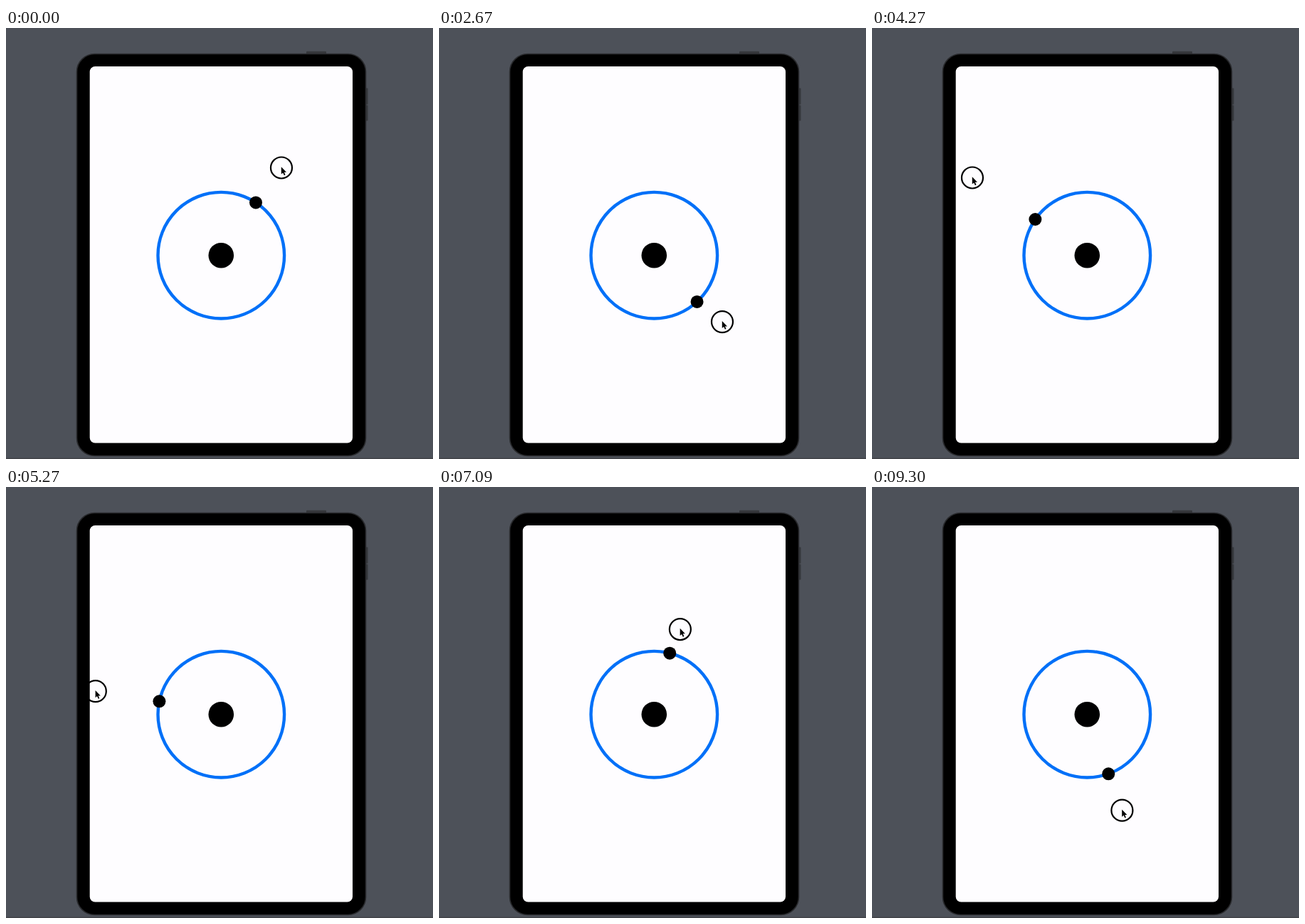
Recreate the animation shown at these times as an HTML page. Size 600 px wide and 606 px high, loop 9.39 s.

```html
<!DOCTYPE html>
<html lang="en">
<head>
<meta charset="utf-8">
<title>Orbit drag</title>
<style>
  html, body { margin: 0; width: 100%; height: 100%; overflow: hidden; background: #4d5159; }
  svg { display: block; width: 100vw; height: 100vh; }
</style>
</head>
<body>
<svg viewBox="0 0 600 606">
  <rect width="600" height="606" fill="#4d5159"/>
  <rect y="604.5" width="600" height="1.5" fill="#424449"/>
  <g fill="#36383c">
    <rect x="422" y="32.8" width="28" height="4" rx="1"/>
    <rect x="505" y="84.5" width="3.5" height="23" rx="1"/>
    <rect x="505" y="108.5" width="3.5" height="22" rx="1"/>
  </g>
  <rect x="99.5" y="36.5" width="406" height="565" rx="25" fill="#000" stroke="#292a2d" stroke-width="1.6"/>
  <rect x="117.7" y="54" width="369.3" height="529.5" rx="7.5" fill="#fefdff"/>
  <circle cx="302.3" cy="319.7" r="88.8" fill="none" stroke="#0070f8" stroke-width="4.4"/>
  <circle cx="302.3" cy="319.7" r="17.8"/>
  <circle id="knob" r="9"/>
  <g id="touch">
    <circle r="15" fill="none" stroke="#000" stroke-width="2.2"/>
    <path d="M-.2-1.2V9L2.2 6.9 3.9 10.7 5.5 10 3.9 6.3H7Z" stroke="#fff" stroke-width=".8" paint-order="stroke"/>
  </g>
</svg>
<script>
  const LOOP = 9390, LAST = 9300, LAG = 22;
  const CX = 302.3, CY = 319.7, R = 88.8;

  // Key poses of the drag around the centre: time, angle in degrees, distance
  const keys = [
    [-300, -68, 148], [0, -55.5, 149.5], [940, 35.6, 158.5], [1360, 106.7, 127.7],
    [1890, 152.5, 120], [2670, 44.3, 133.7], [3100, -10, 129], [3640, -96, 105],
    [4270, -145.9, 194.8], [4420, -148.7, 207], [4560, -148.7, 207],
    [5480, -188, 163], [5850, -236.6, 126], [6240, -196, 137.6], [6950, -91, 122.7],
    [7650, -3, 146], [7940, 44.2, 129.4], [8330, 122.8, 127.9],
    [8550, 134.7, 138], [8740, 134.7, 138], [LAST, 70, 143.6]
  ];

  // Tangent at a key: zero at turns, rests and both ends
  function slope(i, k) {
    const a = keys[i - 1], b = keys[i], c = keys[i + 1];
    if (!a || !c) return 0;
    const h = b[0] - a[0], g = c[0] - b[0];
    const before = (b[k] - a[k]) / h, after = (c[k] - b[k]) / g;
    return before * after <= 0 ? 0 : (before * g + after * h) / (h + g);
  }

  function pose(t) {
    let i = 0;
    while (i < keys.length - 2 && keys[i + 1][0] <= t) i++;
    const a = keys[i], b = keys[i + 1], h = b[0] - a[0], u = (t - a[0]) / h;
    const ease = u * u * (3 - 2 * u);
    const [deg, dist] = [1, 2].map(k =>
      a[k] + (b[k] - a[k]) * ease +
      h * u * (1 - u) * ((1 - u) * slope(i, k) - u * slope(i + 1, k)));
    return { angle: deg * Math.PI / 180, dist };
  }

  // 30 ms steps that lose 10 ms every second
  function tick(t) {
    const shift = 10 * Math.round(t / 1000);
    return Math.min(LAST, Math.floor((t - shift) / 30 + 1e-6) * 30 + shift);
  }

  const knob = document.getElementById('knob');
  const touch = document.getElementById('touch');

  function place(el, angle, dist) {
    const x = CX + dist * Math.cos(angle), y = CY + dist * Math.sin(angle);
    el.setAttribute('transform', `translate(${x.toFixed(2)} ${y.toFixed(2)})`);
  }

  function draw(ms) {
    const t = tick(ms % LOOP), now = pose(t);
    place(touch, now.angle, now.dist);
    place(knob, pose(t - LAG).angle, R);
  }

  const start = performance.now();
  function loop() {
    draw(performance.now() - start);
    requestAnimationFrame(loop);
  }
  draw(0);
  requestAnimationFrame(loop);
</script>
</body>
</html>
```
